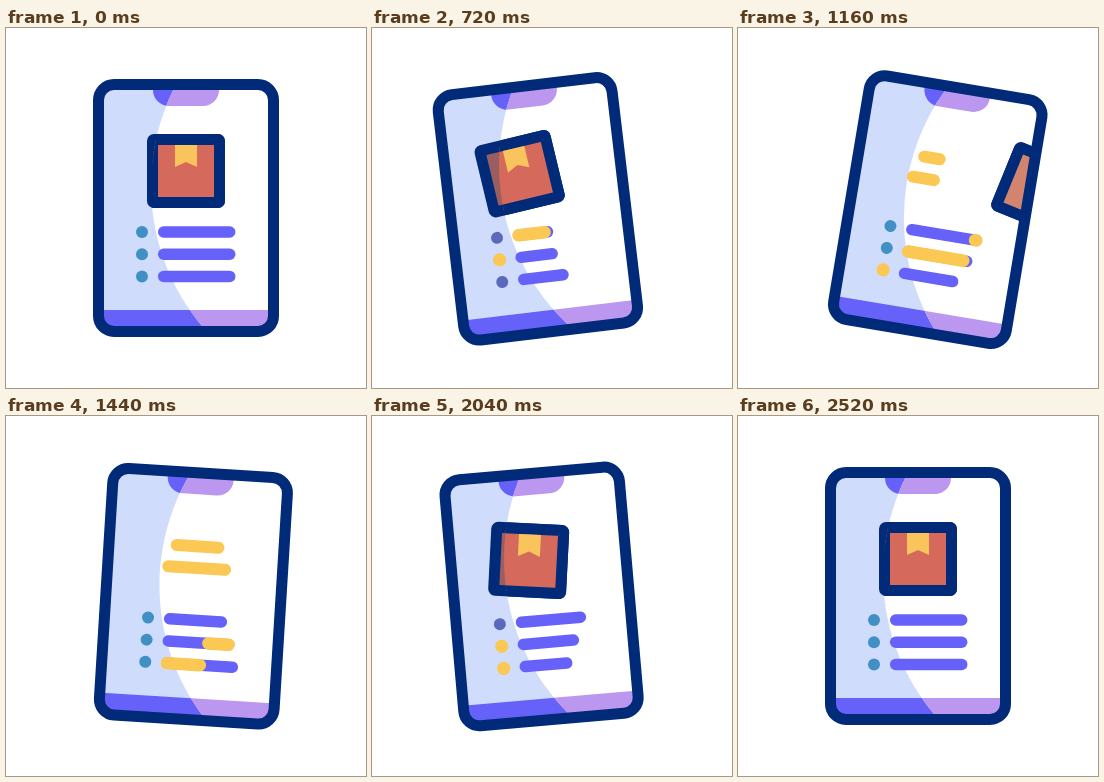
These frames come from a looping animation (360 px wide and 360 px high, 3000 ms). An HTML page:

```html
<!DOCTYPE html>
<html lang="en">
<head>
<meta charset="utf-8">
<title>Parcel list</title>
<style>
  html, body { margin: 0; width: 100%; height: 100%; overflow: hidden; background: #fff; }
  svg { display: block; width: 100vw; height: 100vh; }
  .pill { stroke-linecap: round; fill: none; }
</style>
</head>
<body>
<svg viewBox="0 0 360 360">
  <defs>
    <clipPath id="screen"><rect x="95" y="59" width="170" height="242" rx="12"/></clipPath>
    <clipPath id="lit"><circle cx="363" cy="158" r="218"/></clipPath>
    <path id="trim" d="M147 60V62A16 16 0 0 0 163 78H197A16 16 0 0 0 213 62V60ZM95 282H265V302H95Z"/>
    <g id="box">
      <rect x="146.5" y="111.5" width="67" height="63" rx="1.5" fill="currentColor"
            stroke="#012a78" stroke-width="11" stroke-linejoin="round"/>
      <path d="M169 117H191V139L180 134L169 139Z" fill="#f9c45c"/>
    </g>
  </defs>
  <g id="phone">
    <g clip-path="url(#screen)">
      <rect x="95" y="59" width="170" height="242" fill="#d0dcfc"/>
      <use href="#trim" fill="#6661f8"/>
      <g clip-path="url(#lit)">
        <rect x="95" y="59" width="170" height="242" fill="#fff"/>
        <use href="#trim" fill="#bb97f0"/>
      </g>
      <g id="list"></g>
      <use id="shadeBox" href="#box"/>
      <g clip-path="url(#lit)"><use id="litBox" href="#box"/></g>
    </g>
    <rect x="92.5" y="56.5" width="175" height="247" rx="15.5" fill="none" stroke="#012a78" stroke-width="11"/>
  </g>
</svg>
<script>
const LOOP = 3000;
const YELLOW = [252, 200, 84], BLUE = [64, 144, 196], INDIGO = [92, 104, 188];
const RED = [213, 106, 92], PALE_RED = [211, 133, 112];
const SHADE_RED = [165, 95, 92], SLATE = [80, 88, 120];
const $ = id => document.getElementById(id);

const clamp = x => Math.min(1, Math.max(0, x));
function ramp(t, from, to) {
  const x = clamp((t - from) / (to - from));
  return x * x * (3 - 2 * x);
}
const pulse = (t, from, hold) => ramp(t, from, from + 80) - ramp(t, from + hold, from + hold + 80);
const mix = (a, b, e) => `rgb(${a.map((v, i) => Math.round(v + (b[i] - v) * clamp(e)))})`;

const tilt = t => -8.7 * ramp(t, 200, 600) + 18.4 * ramp(t, 600, 1200)
  - 17.4 * ramp(t, 1200, 1800) + 7.7 * ramp(t, 1800, 2400);

// The box backs up, shoots out on the right and returns from the left.
function boxPose(t) {
  return t < 1460
    ? { x: 147 * ramp(t, 700, 1380) - 14.4 * ramp(t, 200, 700),
        turn: 20.5 * ramp(t, 660, 1200) - 7.5 * ramp(t, 200, 660) }
    : { x: 130 * ramp(t, 1550, 2140) - 130,
        turn: 16 * ramp(t, 1700, 2060) - 8 * ramp(t, 2060, 2400) - 8 };
}

// Each bar shrinks and regrows twice.
function barLength(t) {
  const s = Math.min(2, Math.max(0, (t - 200) / 1000));
  return 66 - (s < 1 ? 37 : 30) * Math.sin(Math.PI * s) ** 2;
}

function add(tag, attrs) {
  const el = document.createElementNS("http://www.w3.org/2000/svg", tag);
  for (const k in attrs) el.setAttribute(k, attrs[k]);
  return $("list").appendChild(el);
}
const pill = (y, color, width) =>
  add("line", { class: "pill", y1: y, y2: y, stroke: color, "stroke-width": width });

// Draws the part of a line between two growing ends.
function span(el, x, len, from, to) {
  el.setAttribute("x1", x + len * from);
  el.setAttribute("x2", x + len * to + 0.01);
  el.style.display = to > 0 && from < 1 ? "" : "none";
}

const yellow = mix(YELLOW, YELLOW, 0);
const rows = [0, 1, 2].map(i => {
  const y = 204 + 22.2 * i;
  return {
    dot: add("circle", { cx: 136, cy: y }),
    bar: pill(y, "#6661f8", 11.5),
    sweep: pill(y, yellow, 12.5)
  };
});
const lines = [0, 1].map(i =>
  ({ el: pill(130 + 21.6 * i, yellow, 12), x: 158 - 8 * i, len: 44 + 16 * i }));

function draw(t) {
  const angle = tilt(t), { x, turn } = boxPose(t);
  $("phone").setAttribute("transform", `rotate(${angle} 180 300)`);
  for (const id of ["shadeBox", "litBox"])
    $(id).setAttribute("transform", `translate(${x} 0) rotate(${turn} 180 143)`);
  $("shadeBox").style.color = mix(SHADE_RED, SLATE, -x / 100);
  $("litBox").style.color = mix(RED, PALE_RED, x / 100);

  rows.forEach(({ dot, bar, sweep }, i) => {
    const glow = pulse(t, 260 + 290 * i, 340) + pulse(t, 1520 + 110 * i, 420);
    dot.setAttribute("r", 6 + 0.6 * glow);
    dot.setAttribute("fill", glow > 0.5 ? yellow : mix(BLUE, INDIGO, -angle / 3));

    const len = barLength(t - 100 * i), s = t - 420 * i;
    span(bar, 157.7, len, 0, 1);
    span(sweep, 157.7, len, ramp(s, 740, 1200), ramp(s, 400, 800));
  });

  for (const { el, x, len } of lines)
    span(el, x, len, ramp(t, 1400, 1700), ramp(t, 1000, 1400));
}

const start = performance.now();
function tick() {
  draw((performance.now() - start) % LOOP);
  requestAnimationFrame(tick);
}
tick();
</script>
</body>
</html>
```
